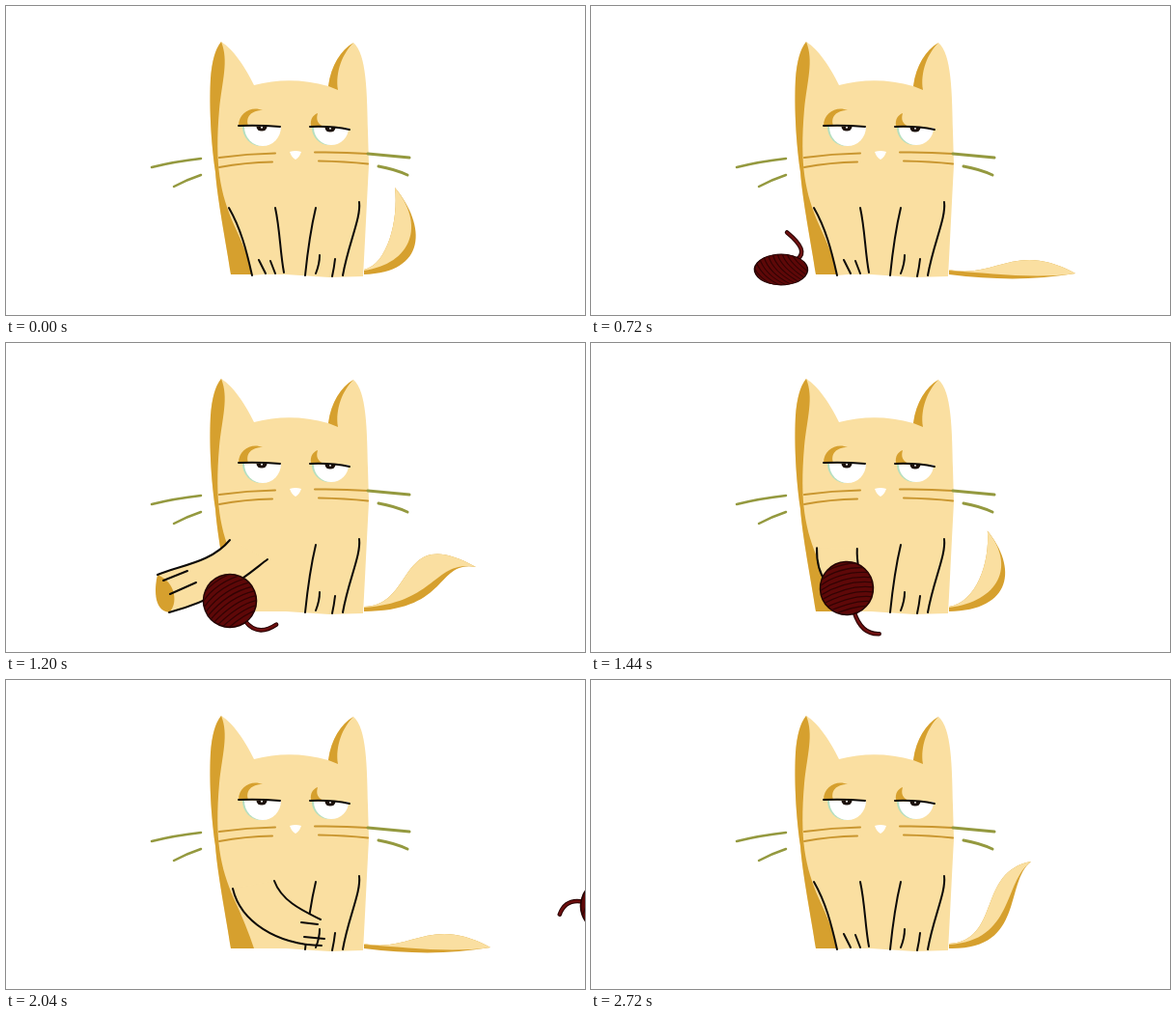
Recreate the animation shown at these times as an HTML page with a canvas. Size 600 by 320 pixels, loop 2800 ms.

```html
<!DOCTYPE html>
<html lang="en">
<head>
<meta charset="utf-8">
<title>Cat and yarn</title>
<style>
  html, body { margin: 0; height: 100%; overflow: hidden; background: #fff; }
  canvas { display: block; }
</style>
</head>
<body>
<canvas id="stage" width="600" height="320"></canvas>
<script>
const ctx = document.getElementById('stage').getContext('2d');
const LOOP = 2800, STEP = 40;
const FUR = '#fadfa1', SHADE = '#d6a02e', INK = '#0c0a08', OLIVE = '#94993f';

// Key rows: time, then the values blended between rows.
// Tail: upper edge controls, tip, lower edge controls; swings twice per loop.
const FLAT = [420, 283, 440, 243, 502, 277, 460, 284, 420, 284];
const TAIL = [
  [0, 395, 268, 407, 222, 403, 188, 436, 228, 436, 276],
  [280, 425, 272, 452, 262, 458, 233, 475, 258, 445, 281],
  [400, ...FLAT],
  [1060, ...FLAT],
  [1200, 425, 272, 405, 186, 487, 232, 445, 225, 460, 278],
  [1320, 425, 270, 400, 198, 456, 188, 428, 210, 450, 280],
  [1400, 395, 268, 407, 222, 403, 188, 436, 228, 436, 276]
];

// Arm: outer curve, inner curve, two toe lines, paw pad amount.
const REST = [231, 209, 243, 230, 249, 252, 255, 279, 279, 209, 284, 232, 284, 255, 288, 276,
  262, 263, 269, 277, 274, 264, 279, 277, 0];
const REACH = [232, 204, 212, 228, 180, 230, 157, 240, 271, 224, 250, 240, 225, 264, 169, 279,
  163, 246, 188, 236, 170, 260, 197, 248, 1];
const CROSS = [235, 216, 243, 250, 280, 274, 327, 275, 278, 208, 286, 230, 310, 240, 326, 248,
  306, 251, 323, 253, 309, 266, 330, 268, 0];
const ARM = [[0, ...REST], [840, ...REST], [1120, ...REACH], [1240, ...REACH],
  [1560, ...CROSS], [2200, ...CROSS], [2480, ...REST], [LOOP, ...REST]];

// Ball: x, y, squash, hop height, string start angle, end angle, end distance.
const BALL = [
  [80, -30, 267, 1, 40, -190, -220, 36],
  [400, 148, 274, .6, 30, -95, -105, 21],
  [720, 197, 273, .58, 20, -33, -81, 39],
  [1040, 230, 271, .82, 0, 40, 10, 50],
  [1200, 232, 267, 1, 0, 53, 27, 54],
  [1680, 298, 241, 1, 25, 92, 82, 62],
  [2040, 623, 234, 1, 0, 190, 170, 50],
  [2100, 680, 240, 1, 0, 210, 190, 50]
];

const smooth = u => u * u * (3 - 2 * u);

function sample(keys, t, ease = u => u) {
  const i = keys.findIndex((row, n) => n + 1 < keys.length && t < keys[n + 1][0]);
  const a = keys[i], b = keys[i + 1], u = (t - a[0]) / (b[0] - a[0]), k = ease(u);
  return { u, from: a, v: a.slice(1).map((value, n) => value + (b[n + 1] - value) * k) };
}

function fill(path, color) {
  ctx.fillStyle = color;
  ctx.fill(new Path2D(path));
}

function line(path, color = INK, width = 2) {
  ctx.strokeStyle = color;
  ctx.lineWidth = width;
  ctx.stroke(new Path2D(path));
}

function drawTail(t) {
  const p = sample(TAIL, t % 1400).v;
  const upper = `M371 273C${p.slice(0, 6)}`;
  const lower = p.slice(6);
  const inner = [lower[0] - 1, lower[1] - 1,
    lower[2] * .75 + p[0] * .25 - 5, lower[3] * .7 + p[1] * .3 - 7];
  fill(`${upper}C${lower} 371 278Z`, SHADE);
  fill(`${upper}C${inner} 371 274Z`, FUR);
}

function drawEye(lid, x, y, rx, ry, brow) {
  fill(brow, SHADE);
  ctx.fillStyle = '#b5dfc0';
  ctx.beginPath();
  ctx.ellipse(x - 2, y, rx, ry, 0, 0, Math.PI);
  ctx.fill();
  ctx.fillStyle = '#fff';
  ctx.beginPath();
  ctx.ellipse(x, y, rx, ry, 0, 0, Math.PI);
  ctx.fill();
  ctx.fillStyle = '#1c110a';
  ctx.beginPath();
  ctx.ellipse(x - 1, y, 5.5, 4.5, 0, 0, Math.PI);
  ctx.fill();
  ctx.fillStyle = '#fff';
  ctx.fillRect(x - 2, y, 2, 1.5);
  line(lid, INK, 2);
}

function drawBody() {
  fill(`M223 37C236 45 249 65 257 82Q295 72 334 83C337 61 347 46 360 38
    C374 50 374 90 375 130L376 165C374 200 372 245 370 280L335 281L290 278L233 278
    C228 245 219 200 217 172C211 130 211 95 212 75Q214 48 223 37Z`, FUR);
  fill(`M223 37C231 57 224 77 221 107C216 165 222 194 236 226Q249 254 257 278
    L233 278C228 245 219 200 217 172C211 130 211 95 212 75Q214 48 223 37Z`, SHADE);
  fill('M360 38C347 46 337 61 334 83L344 87C341 68 349 49 360 38Z', SHADE);

  drawEye('M241 124Q262 123 284 125', 266, 125, 19, 20,
    'M241 124C241 110 255 103 266 108C254 108 248 115 251 124Z');
  drawEye('M315 125Q337 124 356 128', 337, 126, 18, 18,
    'M316 125C315 117 318 113 323 111C321 118 323 122 329 125Z');
  fill('M294 151Q300 149 306 151Q304 157 300 159Q296 157 294 151Z', '#fff');

  line('M221 157Q250 153 279 152.500M221 167Q248 162 276 161.500', '#c9962f');
  line('M320 151.500Q348 151 375 153M324 160.500Q352 161 375 163.500', '#c9962f');
  line('M151 167Q175 161 202 158M174 187Q187 180 202 175', OLIVE, 2.5);
  line('M375 153L418 157M386 166Q403 169 416 175', OLIVE, 3);
}

function drawArms(t) {
  const p = sample(ARM, t, smooth).v;
  const [ax, ay, bx, by] = [p[6], p[7], p[14], p[15]];
  const outer = `M${p.slice(0, 2)}C${p.slice(2, 8)}`;
  const inner = `M${p.slice(8, 10)}C${p.slice(10, 16)}`;
  line('M321 209C316 230 313 250 310 279M366 203C368 220 355 245 349 279');
  fill(`${outer}L${bx} ${by}C${p.slice(12, 14)} ${p.slice(10, 12)} ${p.slice(8, 10)}Z`, FUR);
  if (p[24] > .05) {
    const k = p[24];
    fill(`M${ax} ${ay}C${ax - 3 * k} ${ay + 12} ${bx - 17 * k} ${by - 2} ${bx} ${by}
      C${bx + 9 * k} ${by - 8} ${ax + 20 * k} ${ay + 8} ${ax} ${ay}Z`, SHADE);
  }
  line(outer);
  line(inner);
  line(`M${p.slice(16, 18)}L${p.slice(18, 20)}M${p.slice(20, 22)}L${p.slice(22, 24)}`);
  line('M325 258Q325 267 321 277M341 262Q340 271 338 280');
}

function drawBall(t) {
  if (t < 80 || t >= 2100) return;
  const { u, from, v } = sample(BALL, t);
  const [x, y, squash, , start, end, reach] = v;
  const arc = Math.sin(Math.PI * u);
  const polar = (deg, r) => [Math.cos(deg * Math.PI / 180) * r, Math.sin(deg * Math.PI / 180) * r];
  ctx.save();
  ctx.translate(x, y - from[4] * arc);

  const string = `M${polar(start, squash < .8 ? 20 : 26)}Q${polar(start, reach * .8 + 4)} ${polar(end, reach)}`;
  line(string, '#260202', 4.5);
  line(string, '#6e1010', 2.5);

  ctx.scale(1, squash + (1 - squash) * arc);
  ctx.rotate((start - 75) * Math.PI / 180);
  ctx.beginPath();
  ctx.arc(0, 0, 27.5, 0, 7);
  ctx.fillStyle = '#5e0808';
  ctx.fill();
  ctx.strokeStyle = '#210101';
  ctx.lineWidth = 1.5;
  ctx.stroke();
  ctx.clip();
  for (let i = -5; i <= 5; i++) {
    const d = i * 5;
    line(`M-27 ${d + 6}Q${i * 2} ${d - 9} 27 ${d - 5}`, '#320303', 1.3);
  }
  ctx.restore();
}

function frame(now) {
  const t = Math.floor(now % LOOP / STEP) * STEP;
  ctx.fillStyle = '#fff';
  ctx.fillRect(0, 0, 600, 320);
  ctx.lineCap = 'round';
  drawTail(t);
  drawBody();
  drawArms(t);
  drawBall(t);
  requestAnimationFrame(frame);
}
requestAnimationFrame(frame);
</script>
</body>
</html>
```
